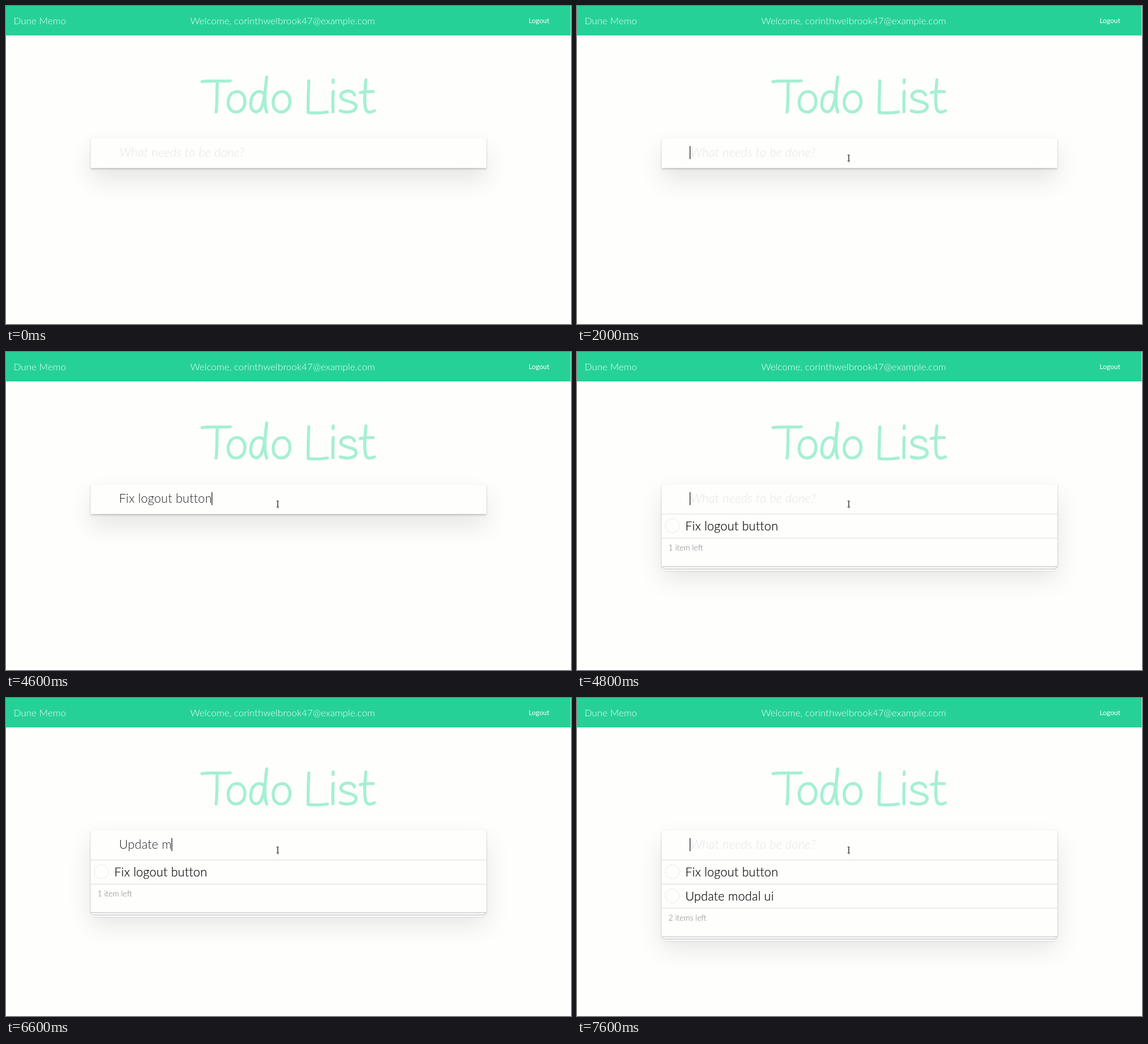
Recreate the animation shown at these times as an HTML page. Size 960x540 px, loop 8 s.

```html
<!DOCTYPE html>
<html lang="en">
<head>
<meta charset="utf-8">
<title>Todo List</title>
<style>
  html, body { margin: 0; width: 100%; height: 100%; overflow: hidden; background: #fefefd; }
  #stage { position: relative; width: 960px; height: 540px; overflow: hidden; }
  #card, #stack { position: absolute; left: 144px; width: 672px; }
  #card {
    top: 224px;
    background: #fefefd;
    box-shadow: 0 1.6px 3.2px rgba(0,0,0,.2), 0 20px 40px rgba(0,0,0,.1);
  }
  #stack {
    height: 40px;
    box-shadow: 0 .8px .8px rgba(0,0,0,.2),
      0 6.4px 0 -2.4px #f6f6f6, 0 7.2px .8px -2.4px rgba(0,0,0,.2),
      0 12.8px 0 -4.8px #f6f6f6, 0 13.6px 1.6px -4.8px rgba(0,0,0,.2);
  }
  svg { position: absolute; left: 0; top: 0; }
  text { font-family: Lato, "Open Sans", sans-serif; font-weight: 300; white-space: pre; }
  .bar { font-size: 16.4px; fill: #f2fffa; }
  .entry { font-size: 20.8px; letter-spacing: .01em; fill: #222; }
  .hint { font-style: italic; letter-spacing: .016em; fill: #e4e4e4; }
  .task { fill: #080808; stroke: #080808; stroke-width: .2px; }
  .count { font-size: 13.3px; fill: #777; }
  .title { fill: none; stroke: #a6efd4; stroke-width: 5.2; stroke-linecap: round; stroke-linejoin: round; }
</style>
</head>
<body>
<div id="stage">
  <div id="card"></div>
  <div id="stack"></div>
  <svg width="960" height="540" viewBox="0 0 960 540">
    <rect width="959.5" height="50" fill="#26d197"/>
    <text class="bar" x="13" y="31">Dune Memo</text>
    <text class="bar" x="470" y="31" text-anchor="middle">Welcome, corinthwelbrook47@example.com</text>
    <text x="888" y="29" font-size="11.6" style="font-weight:400" fill="#fff">Logout</text>

    <g class="title" role="img" aria-label="Todo List">
      <path d="M333 128.5C347 126 364 128.5 381 127M359 129C358 147 359 164 357 180"/>
      <path id="letterO" d="M391 145.5C382 146 377 156 377.5 165C378 175 384 180 391 180C400 180 406 172 406 162C406 152 400 144.5 391 145.5Z"/>
      <path d="M438 149C431 141 417 146 416 164C415 177 422 181 428 179C436 176 439 160 443 120.500C440 143 438 168 443 180"/>
      <use href="#letterO" x="76.500"/>
      <path d="M514.500 127C514 145 513 164 513.500 181C524 182 535 182 546 180"/>
      <path d="M556 125.500L555.800 130M556 145C555 156 555.500 168 555.500 179.500"/>
      <path d="M592 151C590 142 571 142 569 152C567 164 596 160 595 171C594 182 576 181 568 178"/>
      <path d="M611.500 125.500C610 142 608 162 611 174C613 182 620 181 626 178M602 147C610 145 617 145 624 145.500"/>
    </g>

    <path d="M144 224.500H816" stroke="#000" stroke-opacity=".02"/>
    <text id="hint" class="entry hint" x="193" y="255.500">What needs to be done?</text>
    <text id="typed" class="entry" x="192" y="255.500"></text>
    <rect id="caret" y="238" width="1.2" height="22" fill="#111"/>

    <g id="rows"></g>
    <text id="count" class="count" x="155.500"></text>

    <path id="arrow" d="M0 0V12L3 9.500L5 14L7 13L5 9H9Z" fill="#111" stroke="#fff" stroke-width=".8"/>
    <g id="beam" fill="none">
      <path d="M.8 -4.500V6M-1 6.500H2.500" stroke="#999" stroke-opacity=".6" stroke-width="2"/>
      <path d="M-2 -5H2M0 -5V5M-2 5H2" stroke="#333" stroke-width="1.1"/>
    </g>
  </svg>
</div>
<script>
const LOOP = 8000;
const FIELD_BOTTOM = 275, ROW = 41, FOOTER = 48;

// Each entry: keys are [time, characters visible]; it is added to the list at `done`.
const entries = [
  { text: 'Fix logout button', done: 4800, keys: [
    [2300, 1], [2500, 3], [2700, 4], [3200, 5], [3400, 6], [3500, 7], [3600, 8],
    [3700, 10], [3800, 11], [4000, 12], [4300, 13], [4400, 15], [4500, 16], [4600, 17]] },
  { text: 'Update modal ui', done: 7600, keys: [
    [5800, 1], [5900, 2], [6000, 3], [6100, 5], [6200, 6], [6400, 7], [6600, 8],
    [6700, 9], [6800, 10], [6900, 12], [7000, 13], [7200, 14], [7300, 15]] }
];
const hiddenCaret = [[0, 800], [1400, 2000], [5400, 5800]];

const $ = id => document.getElementById(id);
const show = (el, on) => { el.style.display = on ? '' : 'none'; };

$('rows').innerHTML = entries.map((entry, i) => {
  const y = FIELD_BOTTOM + i * ROW;
  return `<g><path d="M144 ${y + .3}H816" stroke="#e8e8e8" stroke-width="1.4"/>
    <circle cx="162" cy="${y + 20}" r="12" fill="none" stroke="#ebebeb"/>
    <text class="entry task" x="184" y="${y + 27.5}">${entry.text}</text>
    <path d="M144 ${y + ROW + .3}H816" stroke="#e8e8e8" stroke-width="1.4"/></g>`;
}).join('');

function typedAt(t) {
  const entry = entries.find(e => t >= e.keys[0][0] && t < e.done);
  if (!entry) return '';
  return entry.text.slice(0, entry.keys.filter(([at]) => at <= t).pop()[1]);
}

function drawField(t) {
  const text = typedAt(t);
  const typed = $('typed');
  if (typed.textContent !== text) typed.textContent = text;
  show($('hint'), !text);
  show($('caret'), !hiddenCaret.some(([from, to]) => t >= from && t < to));
  $('caret').setAttribute('x', 191.5 + (text ? typed.getComputedTextLength() : 0));
}

function drawList(t) {
  const n = entries.filter(e => t >= e.done).length;
  const height = 51 + (n ? n * ROW + FOOTER : 0);
  $('card').style.height = height + 'px';
  $('stack').style.top = 224 + height - 40 + 'px';
  show($('stack'), n);
  [...$('rows').children].forEach((row, i) => show(row, i < n));
  show($('count'), n);
  $('count').textContent = `${n} item${n === 1 ? '' : 's'} left`;
  $('count').setAttribute('y', FIELD_BOTTOM + n * ROW + 21);
}

function drawPointer(t) {
  const step = Math.floor(t / 100) * 100;
  const left = 1 - Math.min(1, Math.max(0, (step - 100) / 400));
  const x = 461.5 + 488 * left ** 2;
  const y = 258 + 274 * left ** 2;
  const overField = y < FIELD_BOTTOM && x < 816;
  for (const [id, on] of [['beam', overField], ['arrow', !overField]]) {
    show($(id), on && t >= 100);
    $(id).setAttribute('transform', `translate(${x} ${y})`);
  }
}

function render(t) {
  drawField(t);
  drawList(t);
  drawPointer(t);
}

const start = performance.now();
function frame() {
  render((performance.now() - start) % LOOP);
  requestAnimationFrame(frame);
}
frame();
</script>
</body>
</html>
```
